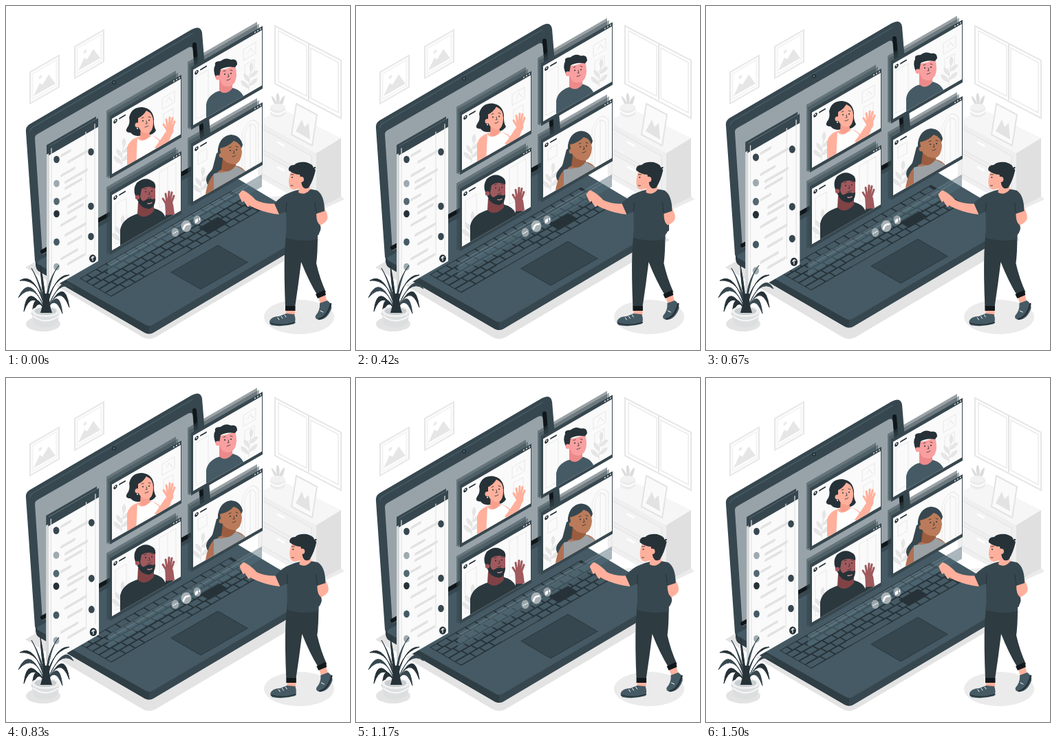
Animation, 500 px wide and 500 px high, one loop 1.54 s. Source, as an HTML page:

```html
<!DOCTYPE html>
<html lang="en">
<head>
<meta charset="utf-8">
<title>Video call</title>
<style>
html, body { margin: 0; height: 100%; overflow: hidden; background: #fff; }
svg { display: block; width: 100vw; height: 100vh; }
.line { fill: none; stroke-linecap: round; stroke-linejoin: round; }
</style>
</head>
<body>
<svg id="stage" viewBox="0 0 500 500"></svg>
<script>
const path = (d, fill, extra = '') => `<path d="${d}" fill="${fill}" ${extra}/>`;
const line = (d, color, width = 1) => `<path class="line" d="${d}" stroke="${color}" stroke-width="${width}"/>`;
const dot = (x, y, r, fill) => `<circle cx="${x}" cy="${y}" r="${r}" fill="${fill}"/>`;
const oval = (x, y, rx, ry, fill) => `<ellipse cx="${x}" cy="${y}" rx="${rx}" ry="${ry}" fill="${fill}"/>`;
const box = (x, y, w, h, fill, extra = '') => `<rect x="${x}" y="${y}" width="${w}" height="${h}" fill="${fill}" ${extra}/>`;
const wall = (x, y) => `transform="matrix(1 -.577 0 1 ${x} ${y})"`;
const floor = (x, y) => `transform="matrix(1 -.577 1 .577 ${x} ${y})"`;
const INK = '#263238', SLATE = '#37474f', STEEL = '#455a64', PEACH = '#ffb09c';
const PINK = '#fa9f9f', BROWN = '#a0595d', TAN = '#bb7b5a';

const picture = (x, y) => `<g ${wall(x, y)}>
  ${box(0, 0, 42, 46, '#fafafa', 'stroke="#e6e6e6" stroke-width="2"')}
  ${box(4, 5, 34, 36, '#fff', 'stroke="#efefef"')}
  ${path('M5 38L14 24L18 29L27 19L37 38Z', '#e6e6e6')}${dot(15, 16, 2.5, '#ebebeb')}</g>`;

const room = () => picture(35, 96) + picture(100, 59) +
  // window
  path('M391 29L487 79V163L391 113Z', '#fff', 'stroke="#e6e6e6" stroke-width="2"') +
  path('M396 36L437 58V131L396 110ZM443 61L483 82V155L443 134Z', '#fff', 'stroke="#ebebeb" stroke-width="1.5"') +
  line('M440 56V136', '#e3e3e3', 2) +
  // cabinet
  path('M352 280L451 300L492 281L480 270Z', '#ebebeb') +
  path('M366 167L402 150L487 192L451 214Z', '#f6f6f6') +
  path('M366 167L451 214V296L366 248Z', '#efefef') +
  path('M451 214L487 192V277L451 296Z', '#e0e0e0') +
  path('M372 178L444 218V248L372 208ZM372 214L444 254V284L372 244Z', '#f2f2f2', 'stroke="#e2e2e2"') +
  line('M395 198L404 203M395 234L404 239', '#fff', 3) +
  path('M422 142L452 158L445 203L415 187Z', '#fafafa', 'stroke="#e3e3e3" stroke-width="2"') +
  path('M421 182L430 165L434 176L440 170L442 194Z', '#e3e3e3') +
  // shelf plant
  path('M394 148Q385 134 386 130Q392 136 394 142Q391 128 395 126Q399 132 397 142Q401 131 405 130Q405 140 398 148Z', '#dcdcdc') +
  path('M384 147V157Q395 167 406 157V147Z', '#ebebeb') + oval(395, 147, 11, 5, '#f2f2f2') +
  line('M385 153Q395 161 405 153', '#fff', 2) +
  // floor shadows
  path('M28 380L52 366L440 330L456 340L218 481Q208 487 198 481Z', '#e3e3e3') +
  oval(426, 452, 51, 25, '#ebebeb') + oval(54, 462, 25, 11, '#e3e3e3');

function keyboard() {
  let keys = box(0, 0, 220, 46, INK);
  for (let row = 0; row < 5; row++) {
    for (let x = 1; x < 219;) {
      const w = x === 1 ? 8 + row * 3 : Math.min(12, 219 - x);
      if (w > 2) keys += box(x, row * 9.1 + 1, w, 7.2, STEEL);
      x += w + 1.8;
    }
  }
  return `<g ${floor(107, 396)}>${keys}${box(150, 23, 28, 15, INK)}${box(60, 37, 52, 8, STEEL)}</g>`;
}

const laptop = () =>
  path('M29 183Q28 176 34 172L270 34Q283 27 285 39L302 246L52 380Q44 380 42 370Z', SLATE) +
  line('M35 182Q35 179 39 176L271 40', STEEL, 1.5) +
  path('M42 192Q42 188 46 186L264 61Q271 57 272 64L288 228L53 361Z', '#98a3a9') +
  line('M274 56L288 226L53 357', '#10171a', 6) +
  dot(157, 111, 3, INK) + dot(157, 111, 1.2, '#607d8b') +
  path('M43 373L208 463L455 320V332L214 475Q208 478 202 475L47 385Q43 382 43 373Z', SLATE) +
  path('M43 373L208 463V476.500L202 475L47 385Q43 382 43 373Z', '#2f3d44') +
  path('M46 371L300 229L449 318Q454 321 449 325L214 463Q208 467 202 463L46 375Z', STEEL) +
  keyboard() + `<g ${floor(240, 387)}>${box(0, 0, 68, 43, SLATE, 'stroke="#2c3a41"')}</g>`;

const leaves = (x, y) => `<g stroke="#e2e2e2" fill="#e6e6e6" transform="translate(${x} ${y})">
  <path d="M0 0Q-1 -16 4 -34" fill="none"/>
  <path d="M0 -4Q-12 -7 -11 -15Q-2 -13 0 -4M1 -13Q-8 -17 -7 -25Q1 -22 1 -13M1 -8Q5 -18 12 -18Q11 -10 1 -8M2 -20Q6 -30 13 -29Q10 -21 2 -20M3 -28Q-1 -36 4 -41Q8 -35 3 -28"/></g>`;

function call(id, x, y, plantX, decor, person) {
  const dots = [93, 97, 101].map(dx => dot(dx, 2.8, .9, '#fff')).join('');
  return `<clipPath id="${id}"><rect x="3" y="-60" width="100" height="146" ${wall(x, y)}/></clipPath>
  <g ${wall(x, y)}>
    ${box(-5, -10.5, 101, 97, SLATE, 'opacity=".5"')}${box(-3, -6, 102, 95, SLATE, 'opacity=".45"')}
    ${box(0, 0, 104, 91, SLATE)}${box(3, 5.5, 100, 80.5, '#fafafa')}${dots}
    <g fill="none" stroke="#e8e8e8">${decor}</g>
  </g>
  <g clip-path="url(#${id})">${leaves(x + plantX, y + 83 - plantX * .577)}${person}</g>
  <g ${wall(x, y)}>${dot(8, 12, 2.8, INK)}${dot(8, 11.4, 1, '#fff')}${line('M14 11.5H22', INK, 2)}</g>`;
}

// eyes, brows, nose and mouth, centred on the nose
const face = (x, y) => `<g transform="translate(${x} ${y})">
  ${dot(-4, -2, 1, INK)}${dot(5, -3, 1, INK)}
  ${line('M-6 -6L-3 -7M4 -8L7 -7M1 -2L2 2L0 2M-1 7Q2 7 4 5', INK, .8)}</g>`;

const hand = (x, y, color) => `<g transform="translate(${x} ${y})">
  ${line('M-3 6L-8 -2M-2 3L-4 -9M0 3L1 -12M2 3L5 -11M4 5L8 -6', color, 3)}${oval(1, 6, 5.5, 8, color)}</g>`;

const people = {
  bob:
    path('M181 184Q172 184 176 177Q181 171 179 162Q182 147 198 147Q213 149 215 164Q214 174 218 181Q212 190 200 187Q188 192 181 184Z', INK) +
    path('M176 206Q179 194 193 190L212 188Q226 194 228 201L225 222L176 240Z', PEACH) +
    path('M191 192Q197 201 212 188L222 195L227 215L189 234Z', '#fff') +
    path('M196 172L195 192Q201 199 209 188L208 178Z', '#f79f8d') +
    path('M192 163Q199 160 204 152Q214 156 214 168Q214 183 206 185Q194 184 192 174Z', PEACH) +
    dot(191, 173, 3.5, PEACH) + dot(191, 178, 1, '#fff') + face(203, 169) +
    path('M216 206Q224 196 232 183L241 186Q236 203 225 211Z', PEACH) + hand(237, 174, PEACH),
  crop:
    path('M291 166V143Q293 130 308 124L329 119Q343 122 347 136V150Z', STEEL) +
    path('M310 106V123Q319 131 329 120V110Z', '#ec8a8b') +
    path('M308 92Q318 94 333 86Q337 101 333 110Q327 121 315 115Q309 108 308 92Z', PINK) +
    path('M305 104Q300 93 304 86Q302 80 312 80Q319 74 327 78Q336 76 336 85L333 89Q320 87 312 92L310 103Z', INK) +
    dot(308, 104, 3.5, PINK) + face(322, 101),
  beard:
    path('M166 350V325Q169 310 188 303L215 294Q228 297 232 307L234 318L226 330Z', '#2b383e') +
    path('M192 285L191 302Q202 312 215 298V285Z', '#7f4346') +
    path('M190 268Q200 255 217 263L217 282Q214 293 205 294Q195 292 190 278Z', BROWN) +
    path('M188 276Q184 266 190 257Q203 246 215 256Q218 260 217 265Q206 260 197 266L195 277Q197 285 201 283Q208 278 213 281L217 280Q217 293 208 295Q196 294 192 284Z', INK) +
    dot(191, 278, 3.2, BROWN) + line('M206 287Q209 288 212 286', '#d38f90', 1.5) + face(207, 272) +
    path('M224 322Q232 312 232 302L243 303Q243 315 231 328Z', '#2b383e') +
    path('M232 304L231 284L243 288L245 303Z', BROWN) + hand(236, 282, BROWN),
  long:
    path('M296 263Q286 253 296 242Q308 229 308 208Q311 189 327 187Q341 188 344 202L333 230Q322 262 296 263Z', SLATE) +
    path('M289 282Q291 255 304 242L330 231Q346 233 351 246L347 260Z', '#b07154') +
    path('M302 275V240Q317 247 333 232L346 239L350 258Z', '#9ba1a4') +
    path('M315 222L313 238Q324 245 334 232V222Z', '#9a5d40') +
    path('M311 207Q324 204 331 196Q342 199 343 212Q342 226 334 230Q320 231 313 219Z', TAN) +
    path('M308 242Q315 226 311 212L306 214L298 245Z', SLATE) +
    dot(313, 217, 3.3, TAN) + face(330, 212),
};

const shelfDecor = '<path d="M76 18h18v16h-18zM78 42h14v18h-14zM82 28l4-6l5 9"/>';
const doorDecor = '<path d="M74 86V28Q86 5 98 28V86M78 86V30Q86 14 94 30V86M86 20V86M10 20h13v16h-13z"/>';
const panelDecor = '<path d="M72 12h24v52h-24zM84 12V64M8 22h16v58h-16z"/>';

const windows = () =>
  call('a', 151, 160, 17, shelfDecor, people.bob) +
  call('b', 269, 89, 84, shelfDecor + '<path d="M7 18h18v62h-18z"/>', people.crop) +
  call('c', 151, 271, 15, panelDecor, people.beard) +
  call('d', 269, 200, 14, doorDecor, people.long);

const toolbar = () => `<g ${wall(148, 377)}>
  ${box(0, -3, 224, 18, '#546e7a', 'opacity=".5"')}${line('M0 -3H224M3 2H224', '#cfd8dc40')}</g>` +
  oval(246, 329, 5.5, 6.5, '#9aa5aa') + oval(262, 320, 7.5, 8.5, '#a9b2b6') + oval(278, 311, 5.5, 6.5, '#9aa5aa') +
  [243.5, 246, 248.5].map(x => dot(x, 329 - (x - 246) * .577, .9, '#fff')).join('') +
  line('M258 324Q259 317 266 317', '#fff', 2.6) +
  path('M275 311L279 308.5V313.5L275 316ZM280 310L282 307V312Z', '#fff');

function chat() {
  const bubbles = [[14, 24, 30], [24, 39, 54], [14, 53, 36], [20, 66, 54], [20, 75, 46], [14, 88, 30],
    [24, 104, 54], [24, 113, 48], [14, 125, 38], [20, 143, 52], [24, 158, 46], [14, 174, 40], [24, 187, 50]]
    .map(([x, y, end]) => line(`M${x + 8} ${y}H${end + 4}`, '#e2e2e2', 4)).join('');
  const left = [[223, SLATE], [258, '#9eaaaf'], [284, '#546872'], [302, INK], [343, STEEL], [379, '#9eaaaf']]
    .map(([y, c]) => oval(73.5, y, 4.3, 5.2, c)).join('');
  const right = [212, 291, 335].map(y => oval(123.5, y, 4.3, 5.2, SLATE)).join('');
  return `<g ${wall(59, 206)}>
    ${box(0, -4, 72, 208, '#d5d8d9')}${box(0, -4, 72, 14, SLATE)}
    ${box(4, 0, 71, 208, '#fafafa')}${box(3, 0, 72, 13, SLATE)}
    ${line('M7 5V204M57 10V190M70 6V190', '#e4e4e4', 1.2)}${bubbles}</g>` + left + right +
    oval(126, 367, 5, 5.8, INK) + line('M126 370V364M124 366.5L126 364L128 365', '#fff', 1.2);
}

function plant() {
  const tips = [[20, 399, 46, 388], [18, 424, 38, 388], [26, 444, 34, 402], [37, 381, 50, 400], [50, 377, 54, 410],
    [77, 377, 60, 395], [92, 391, 66, 392], [98, 411, 80, 386], [92, 438, 82, 392], [82, 447, 74, 408], [38, 448, 44, 412]];
  // each leaf arches from the pot to its tip, widest in the middle
  return tips.map(([x, y, cx, cy], i) => {
    const side = Math.sign(x - 58);
    return path(`M58 445Q${cx + side * 3} ${cy - 3} ${x} ${y}Q${cx - side * 4} ${cy + 8} 58 445Z`, i % 2 ? SLATE : INK,
      `stroke="${i % 2 ? SLATE : INK}"`);
  }).join('') +
    path('M37 444L40 461Q57 474 75 461L78 444Z', '#dcdfe0') + oval(57.5, 444, 20.5, 8, '#f0f0f0') +
    oval(57.5, 443.5, 16, 5.5, '#c8cdcf') + path('M50 446Q55 430 54 418L63 418Q62 432 67 446Z', INK) +
    line('M40 451Q57 464 76 451', '#f8f8f8', 2);
}

const man = () =>
  path('M407 435H420V449H407ZM453 420L463 416L467 430L457 434Z', PEACH) +
  path('M383 458Q386 451 397 451L407 447L419 448Q422 456 419 462Q401 467 386 464Q383 462 383 458Z', STEEL) +
  path('M456 432L467 428Q474 433 473 440Q467 456 455 456Q448 455 450 450Q457 442 456 432Z', STEEL) +
  line('M384 461Q401 466 420 460', INK, 1.5) + line('M455 455Q467 452 472 433', INK, 2.5) +
  line('M395 453L397 456M400 451L402 454M405 449L407 452M457 443L461 445', '#fff') +
  path('M407 330L453 333Q453 360 451 374Q456 396 465 416L453 421Q440 400 429 372Q425 405 420 438L406 437Q404 392 405 358Z', '#2e3b41') +
  path('M406 436H420.500V443H406ZM450 419L463 413L465 420L453 425Z', '#12191c') +
  path('M450 299L463 294Q470 306 466 312Q459 320 451 319Z', PEACH) +
  path('M395 287Q376 289 363 282Q355 273 345 268Q338 269 342 278Q348 288 362 294Q382 302 397 303Z', PEACH) +
  line('M344 270L340 274L344 283M348 284L352 290', PEACH, 3.5) +
  path('M413 271Q432 263 452 268Q463 275 463 298L451 302Q451 315 457 319Q459 326 453 333V339Q431 344 407 337Q408 318 407 299L397 303L390 287Q401 275 413 271Z', SLATE) +
  line('M407 299L408 286M451 301L449 286', INK) +
  path('M415 238Q411 249 411 256Q411 267 419 267L426 265L425 271Q434 276 442 267L441 245Z', PEACH) +
  path('M411 239Q410 231 419 231Q424 226 436 227Q447 230 447 236L450 238Q447 253 440 264Q433 268 430 260L427 245Q419 245 411 239Z', INK) +
  line('M442 239L449 235', INK, 2.5) + dot(429, 252, 4, PEACH) + dot(416, 249, 1, INK) +
  line('M414 245L418 245M414 261L417 261', INK, .9);

document.getElementById('stage').innerHTML = room() +
  `<g id="float">${laptop()}${windows()}</g>${toolbar()}<g id="chat">${chat()}</g>${plant()}<g id="man">${man()}</g>`;

const ease = p => { const q = p ** .8; return q * q * (3 - 2 * q); };
function keyed(t, keys) {
  const i = Math.max(1, keys.findIndex(k => k[0] >= t));
  const [t0, v0] = keys[i - 1], [t1, v1] = keys[i];
  return v0 + (v1 - v0) * ease((t - t0) / (t1 - t0));
}
const beat = [[0, 1], [.14, 1.06], [.28, 1], [.42, 1.06], [.7, 1], [1, 1]];
const shake = [0, -1, 2, -4, 4, -4, 4, -4, 2, -1, 0].map((x, i) => [i / 10, x]);
const move = (id, value) => document.getElementById(id).setAttribute('transform', value);

function draw() {
  const t = Math.min(performance.now() % 1540, 1500) / 1500;
  move('float', `translate(0 ${-10 * (1 - Math.abs(1 - 2 * t))})`);
  move('chat', `translate(92 278) scale(${keyed(t, beat)}) translate(-92 -278)`);
  move('man', `translate(${keyed(t, shake)} 0)`);
  requestAnimationFrame(draw);
}
draw();
</script>
</body>
</html>
```
